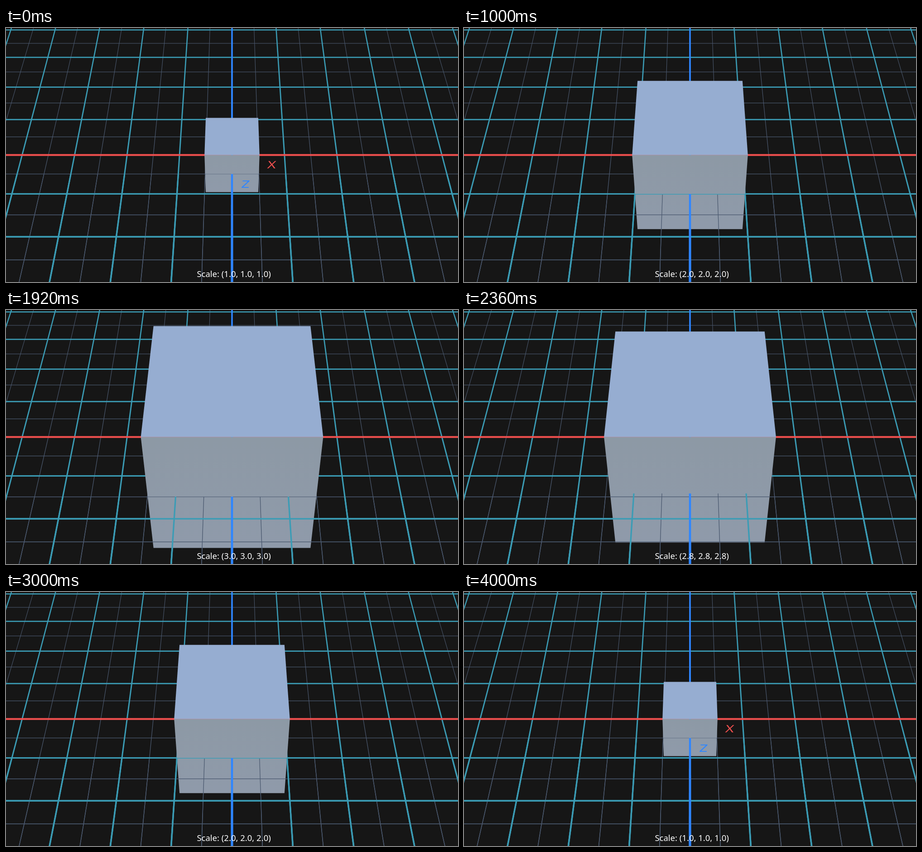
An HTML page with a canvas that plays this animation: 998 by 561 pixels, repeating every 4.04 s.

```html
<!DOCTYPE html>
<html lang="en">
<head>
<meta charset="utf-8">
<title>Scaling a cube</title>
<style>
  html, body { margin: 0; width: 100%; height: 100%; overflow: hidden; background: #161616; }
  canvas { display: block; }
</style>
</head>
<body>
<canvas id="stage" width="998" height="561"></canvas>
<script>
const W = 998, H = 561, CX = 499, CY = 280.5;
const LOOP = 4040, STEP = 40, PERIOD = 4000;

// Camera looks at the centre of the scene from 45 degrees above.
const DIST = 15.2, UNIT = 115.85, FOCAL = UNIT * DIST, R = Math.SQRT1_2;
const FONT = '"Noto Sans", "Open Sans", sans-serif';
const RED = '#f2504f', BLUE = '#2e86ff', TEAL = '#3b9cb5', GRAY = '#4c5a70';

const ctx = document.getElementById('stage').getContext('2d');

function project(x, y, z) {
  const k = FOCAL / (DIST - (y + z) * R);
  return { x: CX + x * k, y: CY - (y - z) * R * k, k };
}

function polygon(c, fill, points) {
  c.fillStyle = fill;
  c.beginPath();
  for (const p of points) c.lineTo(p.x, p.y);
  c.closePath();
  c.fill();
}

function lineAlongX(c, z, width, color) {
  const p = project(0, 0, z), h = width * p.k;
  c.fillStyle = color;
  c.fillRect(0, p.y - h / 2, W, h);
}

function lineAlongZ(c, x, width, color) {
  const a = x - width / 2, b = x + width / 2;
  polygon(c, color, [project(a, 0, -5), project(b, 0, -5), project(b, 0, 3.5), project(a, 0, 3.5)]);
}

function makeGrid() {
  const canvas = document.createElement('canvas');
  canvas.width = W;
  canvas.height = H;
  const c = canvas.getContext('2d');
  const pass = (first, width, color) => {
    for (let n = first; n <= 12; n += 2) {
      if (n === 0) continue;
      if (n >= -9 && n <= 7) lineAlongX(c, n / 2, width, color);
      lineAlongZ(c, n / 2, width, color);
    }
  };
  pass(-11, 0.0105, GRAY);
  pass(-12, 0.0255, TEAL);
  lineAlongX(c, 0, 0.035, RED);
  lineAlongZ(c, 0, 0.036, BLUE);
  return canvas;
}

const grid = makeGrid();

function axisLabel(text, x, z, color) {
  const p = project(x, 0, z);
  ctx.save();
  ctx.transform(1, 0, -0.1, R, p.x, p.y + 0.3);
  ctx.font = '32px ' + FONT;
  ctx.textAlign = 'center';
  ctx.textBaseline = 'alphabetic';
  ctx.fillStyle = color;
  ctx.fillText(text, 0, 11.8);
  ctx.restore();
}

function cube(s) {
  const h = s / 2;
  const back = [project(-h, h, -h), project(h, h, -h)];
  const edge = [project(h, h, h), project(-h, h, h)];
  const low = [project(-h, -h, h), project(h, -h, h)];
  const front = ctx.createLinearGradient(0, CY, 0, low[0].y);
  front.addColorStop(0, '#8d99a5');
  front.addColorStop(1, '#8f9aaa');
  polygon(ctx, front, [...low, ...edge]);
  polygon(ctx, '#96add1', [...back, ...edge]);
}

function draw(time) {
  const t = Math.floor((time % LOOP) / STEP) * STEP;
  const s = 2 - Math.cos(2 * Math.PI * t / PERIOD);

  ctx.fillStyle = '#161616';
  ctx.fillRect(0, 0, W, H);
  ctx.drawImage(grid, 0, 0);
  axisLabel('X', 0.75, 0.25, RED);
  cube(s);

  // The floor in front of the cube covers its lower half.
  const floorY = project(0, 0, s / 2).y;
  ctx.save();
  ctx.beginPath();
  ctx.rect(0, floorY, W, H - floorY);
  ctx.clip();
  ctx.drawImage(grid, 0, 0);
  ctx.restore();
  if (s < 1.5) axisLabel('Z', 0.25, 0.75, BLUE);

  const v = s.toFixed(1);
  ctx.font = '18.5px ' + FONT;
  ctx.textAlign = 'left';
  ctx.textBaseline = 'alphabetic';
  ctx.fillStyle = '#fff';
  ctx.fillText(`Scale: (${v}, ${v}, ${v})`, 421.4, 550);
}

const start = performance.now();
function tick() {
  draw(performance.now() - start);
  requestAnimationFrame(tick);
}
tick();
</script>
</body>
</html>
```
